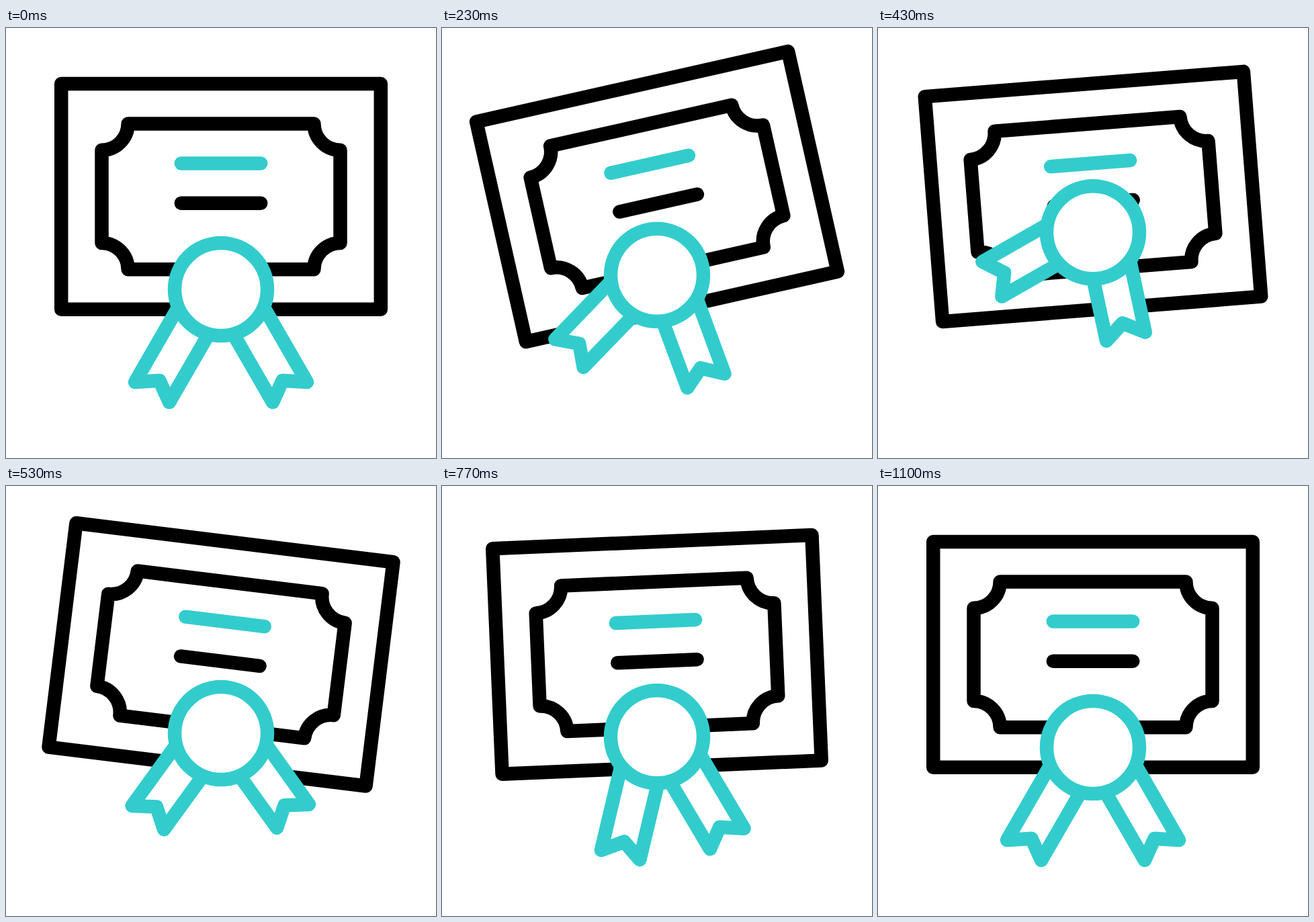
Animation of 640 by 640 pixels, one loop 1670 ms. Source, as an HTML page without scripts:

```html
<!DOCTYPE html>
<html lang="en">
<head>
<meta charset="utf-8">
<title>Certificate</title>
<style>
  @property --f {
    syntax: "<number>";
    inherits: true;
    initial-value: 0;
  }

  html, body {
    margin: 0;
    width: 100%;
    height: 100%;
    overflow: hidden;
    background: #fff;
  }

  /* --f is a 30 fps clock: 33 ticks of motion, then a rest */
  svg {
    display: block;
    width: 100%;
    height: 100%;
    animation: clock 1670ms -5ms infinite;
  }

  @keyframes clock {
    0% { --f: 0; animation-timing-function: steps(33, end); }
    65.868% { --f: 33; animation-timing-function: step-end; }
    100% { --f: 33; }
  }

  /* Each --e is an eased 0 to 1 ramp between two ticks */
  .card {
    --e1: calc((1 - cos(180deg * clamp(0, var(--f) / 10, 1))) / 2);
    --e2: calc((1 - cos(180deg * clamp(0, (var(--f) - 10) / 6, 1))) / 2);
    --e3: calc((1 - cos(180deg * clamp(0, (var(--f) - 16) / 6, 1))) / 2);
    --e4: calc((1 - cos(180deg * clamp(0, (var(--f) - 22) / 5, 1))) / 2);
    --e5: calc((1 - cos(180deg * clamp(0, (var(--f) - 27) / 5, 1))) / 2);
    transform: rotate(calc((-16 * var(--e1) + 23 * var(--e2) - 9.9 * var(--e3) + 4.8 * var(--e4) - 1.9 * var(--e5)) * 1deg));
  }

  .medal {
    --e1: calc((1 - cos(180deg * clamp(0, (var(--f) - 4) / 9, 1))) / 2);
    --e2: calc((1 - cos(180deg * clamp(0, (var(--f) - 13) / 6, 1))) / 2);
    --e3: calc((1 - cos(180deg * clamp(0, (var(--f) - 19) / 7, 1))) / 2);
    --e4: calc((1 - cos(180deg * clamp(0, (var(--f) - 26) / 6, 1))) / 2);
    --in: calc((1 - cos(180deg * clamp(0, (var(--f) - 3) / 8, 1))) / 2);
    --out: calc((1 - cos(180deg * clamp(0, (var(--f) - 15) / 8, 1))) / 2);
    --tuck: calc((var(--in) - var(--out)) * 1px);
    transform: translateY(calc((-84.7 * var(--e1) + 127.4 * var(--e2) - 95.7 * var(--e3) + 53 * var(--e4)) * 1px));
  }

  .left, .right {
    --e1: calc((1 - cos(180deg * clamp(0, (var(--f) - 4) / 7, 1))) / 2);
    --e4: calc((1 - cos(180deg * clamp(0, (var(--f) - 27) / 5, 1))) / 2);
  }

  .left {
    --e2: calc((1 - cos(180deg * clamp(0, (var(--f) - 11) / 10, 1))) / 2);
    --e3: calc((1 - cos(180deg * clamp(0, (var(--f) - 21) / 6, 1))) / 2);
    transform:
      rotate(calc((36 * var(--e1) - 60 * var(--e2) + 29.4 * var(--e3) - 5.4 * var(--e4)) * 1deg))
      translate(calc(7.8 * var(--tuck)), calc(-17.4 * var(--tuck)));
  }

  .right {
    --e2: calc((1 - cos(180deg * clamp(0, (var(--f) - 11) / 7, 1))) / 2);
    --e3: calc((1 - cos(180deg * clamp(0, (var(--f) - 18) / 9, 1))) / 2);
    transform:
      rotate(calc((25 * var(--e1) - 37.7 * var(--e2) + 20.5 * var(--e3) - 7.8 * var(--e4)) * 1deg))
      translate(calc(-8.3 * var(--tuck)), calc(-20.6 * var(--tuck)));
  }

  .card, .medal {
    fill: #fff;
    stroke: #000;
    stroke-width: 20.5;
    stroke-linecap: round;
    stroke-linejoin: round;
  }

  .medal, .teal { stroke: #3cc; }
</style>
</head>
<body>
<svg viewBox="0 0 640 640">
  <defs>
    <path id="ribbon" d="M-64 27L-128 138L-91.5 135.7L-77 168L-18 66"/>
  </defs>
  <g transform="translate(320 250.9)">
    <g class="card">
      <rect x="-237.8" y="-167.9" width="475.6" height="335.8"/>
      <path d="M-138.4-108.4H138.4A39.2 39.2 0 0 0 177.5-69.1V69.1A39.2 39.2 0 0 0 138.4 108.4H-138.4A39.2 39.2 0 0 0-177.5 69.1V-69.1A39.2 39.2 0 0 0-138.4-108.4Z"/>
      <path class="teal" d="M-59.2-49.4H59.2"/>
      <path d="M-59.2 9.8H59.2"/>
    </g>
  </g>
  <g transform="translate(320 389)">
    <g class="medal">
      <g class="left"><use href="#ribbon"/></g>
      <g class="right"><use href="#ribbon" transform="scale(-1 1)"/></g>
      <circle r="69"/>
    </g>
  </g>
</svg>
</body>
</html>
```
